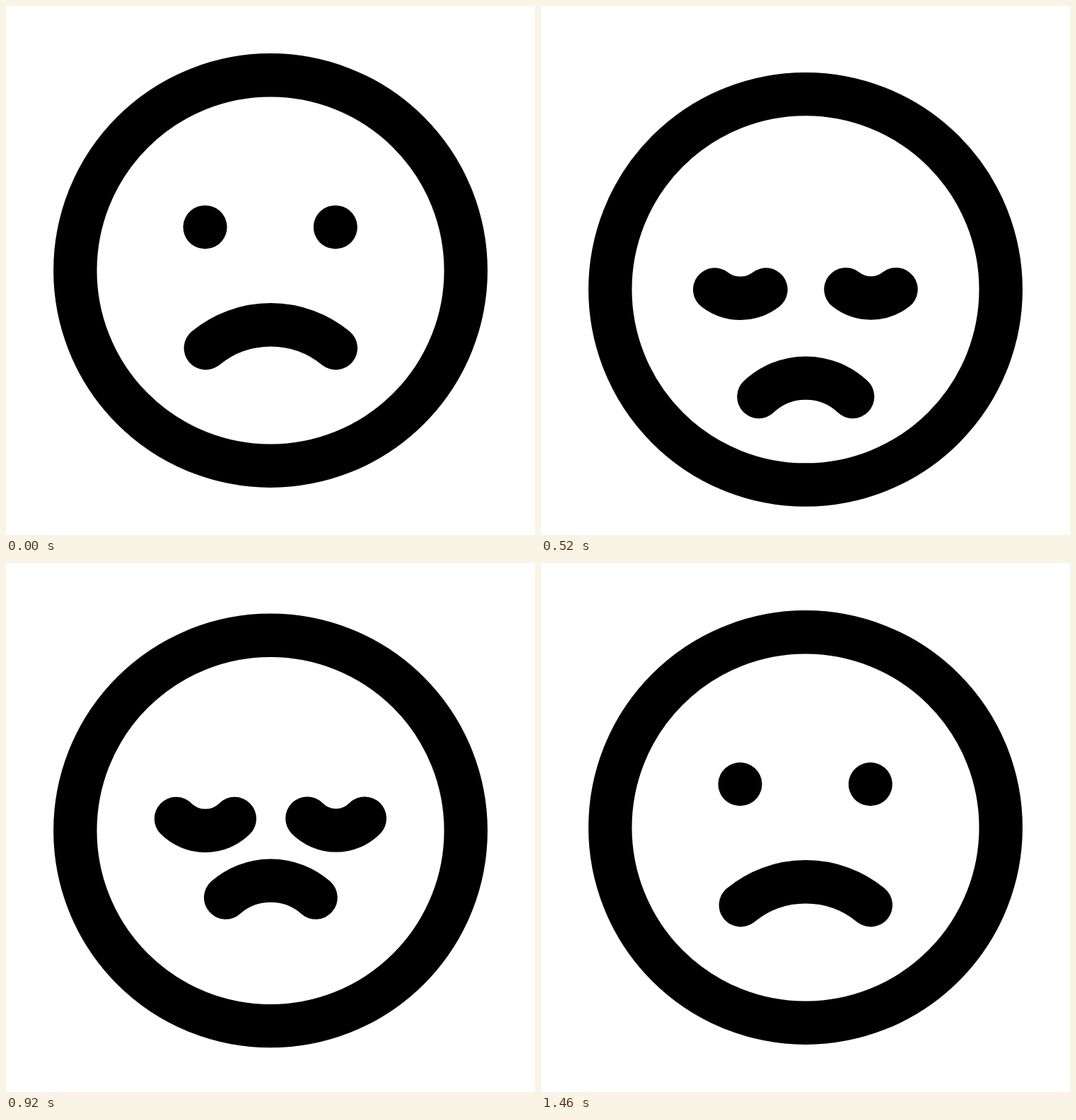
Recreate the animation shown at these times as an HTML page. Size 748 px wide and 748 px high, loop 2400 ms.

```html
<!DOCTYPE html>
<html lang="en">
<head>
<meta charset="utf-8">
<title>Sad face</title>
<style>
  html, body { margin: 0; width: 100%; height: 100%; overflow: hidden; background: #fff; }
  svg { display: block; width: 100%; height: 100%; }
</style>
</head>
<body>
<svg viewBox="0 0 748 748" fill="none" stroke="#000" stroke-width="61.4" stroke-linecap="round">
  <circle id="head" cx="374" cy="374" r="276.2"/>
  <path id="left"/>
  <path id="right"/>
  <path id="mouth"/>
</svg>
<script>
const LOOP = 2400, STEP = 20;

// Cubic bezier easing, solved by bisection
function bezier(x1, x2) {
  return p => {
    let lo = 0, hi = 1, s = p;
    for (let i = 0; i < 24; i++) {
      s = (lo + hi) / 2;
      const x = 3 * x1 * s * (1 - s) ** 2 + 3 * x2 * s * s * (1 - s) + s ** 3;
      if (x < p) lo = s; else hi = s;
    }
    return s * s * (3 - 2 * s);
  };
}
const soft = bezier(.333, .667);
const start = bezier(.333, .833);
const mid = bezier(.167, .833);
const end = bezier(.167, .667);

// Keys are [time, value, easing towards the next key]
function track(keys) {
  return t => {
    if (t <= keys[0][0]) return keys[0][1];
    for (let i = 1; i < keys.length; i++) {
      const [t0, v0, ease] = keys[i - 1], [t1, v1] = keys[i];
      if (t < t1) return v0 + (v1 - v0) * ease((t - t0) / (t1 - t0));
    }
    return keys[keys.length - 1][1];
  };
}
const nod = (times, low, high) => track([
  [times[0], 0, start], [times[1], low, mid], [times[2], high, mid],
  [times[3], low, end], [times[4], 0]
]);
const blink = (a, b, c, d) => track([[a, 0, soft], [b, 1, soft], [c, 1, soft], [d, 0]]);

const headY = nod([200, 500, 800, 1100, 1400], 28, -10);
const eyeY = nod([225, 525, 825, 1125, 1425], 41, -15);
const mouthY = nod([240, 540, 840, 1140, 1415], 64.5, -41.5);
const eyeDrop = blink(225, 540, 1175, 1465);
const eyeClose = blink(240, 600, 1135, 1465);
const mouthShrink = blink(220, 590, 1160, 1465);

const [head, left, right, mouth] =
  ["head", "left", "right", "mouth"].map(id => document.getElementById(id));

// Circular arc through two level ends, bulging by sag
function arc(el, cx, y, half, sag, sweep) {
  const h = Math.max(half, .3), s = Math.max(sag, .01);
  const r = (h * h + s * s) / (2 * s);
  el.setAttribute("d", `M${cx - h} ${y}A${r} ${r} 0 0 ${sweep} ${cx + h} ${y}`);
}

function draw(t) {
  head.setAttribute("cy", 374 + headY(t));

  const k = eyeClose(t), sag = 17 * k ** 2.4;
  const y = 312.7 + 48 * eyeDrop(t) + eyeY(t);
  arc(left, 281.5 + .4 * k, y, 41.4 * k, sag, 0);
  arc(right, 465.8 + .8 * k, y - .4 * k, 40.7 * k, sag, 0);

  const m = mouthShrink(t), rise = 33 - 9 * m ** 3;
  const top = 450.7 + mouthY(t) + 16 * m * m;
  arc(mouth, 374.3, top + rise, 92 - 28.3 * m, rise, 1);
}

const t0 = performance.now();
function tick() {
  const t = (performance.now() - t0) % LOOP;
  draw(Math.floor(t / STEP) * STEP);
  requestAnimationFrame(tick);
}
tick();
</script>
</body>
</html>
```
